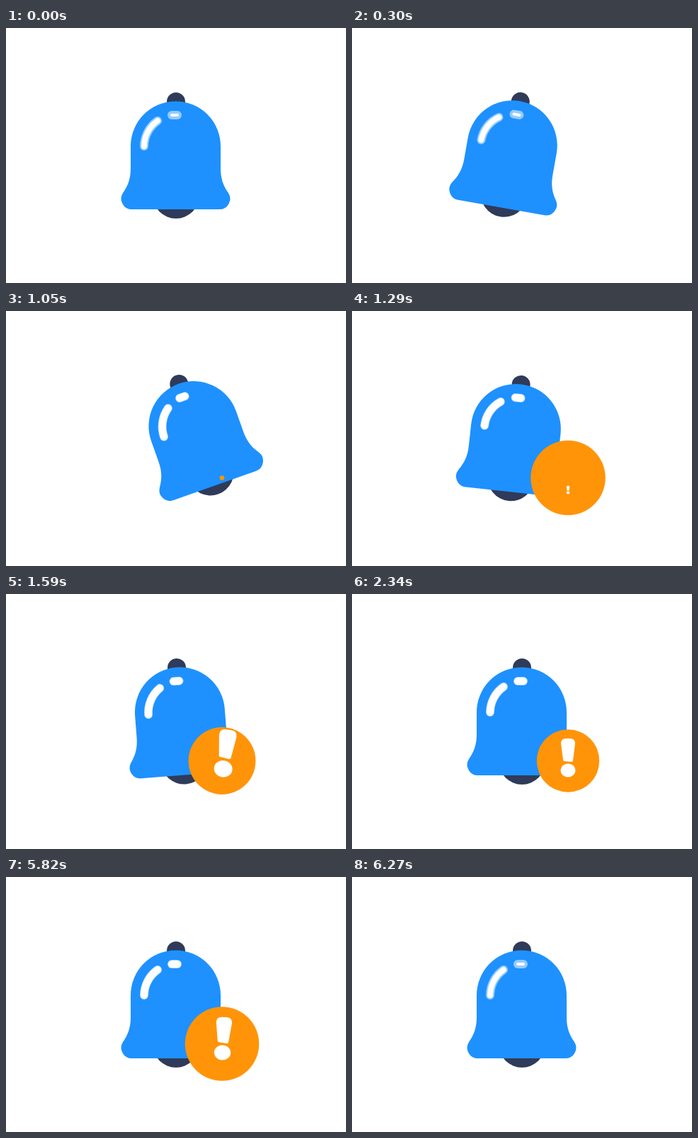
These frames come from a looping animation (480x360 px, 6300 ms). An HTML page:

```html
<!DOCTYPE html>
<html lang="en">
<head>
<meta charset="utf-8">
<title>Bell alert</title>
<style>
  html, body { margin: 0; width: 100%; height: 100%; overflow: hidden; background: #fff; }
  svg { display: block; width: 100%; height: 100%; }
  .shine { fill: none; stroke-width: 12; stroke-linecap: round; }
  .glow { stroke: #94cbfd; }
  .core { stroke: #fff; }
</style>
</head>
<body>
<svg viewBox="0 0 480 360">
  <defs>
    <path id="arc" d="M195 167A44.5 44.5 0 0 1 214 131"/>
    <path id="pill" d="M234 123H242"/>
  </defs>
  <g id="bell">
    <g fill="#2f3b59">
      <circle cx="240" cy="104" r="13"/>
      <circle cx="240" cy="236" r="33"/>
    </g>
    <path fill="#1e91ff" d="M176 198V167A63.5 63.5 0 0 1 303 167V198C303 213 307 223 314 233
      A15 15 0 0 1 301 256H178A15 15 0 0 1 165 233C172 223 176 213 176 198Z"/>
    <g class="shine glow"><use href="#arc"/><use href="#pill"/></g>
    <g class="shine core">
      <use href="#arc" id="arcCore"/>
      <use href="#pill" id="pillCore"/>
    </g>
  </g>
  <circle id="badge" cx="305" cy="235.5" r="0" fill="#ff9408"/>
  <g id="mark" fill="#fff">
    <path d="M295 211Q295 204 302 204H308Q315 204 315 211L312 235Q312 237 310 237L300 236Q298 236 298 234Z"/>
    <ellipse cx="305" cy="249" rx="10.5" ry="9.5"/>
  </g>
</svg>
<script>
const LOOP = 6300, STEP = 30;
// The badge leaves by playing its entrance backwards.
const TURN = 3645;

// Keyframes as [ms, value], eased in and out between neighbours.
const swing = [[0, 0], [655, 23], [1075, -20], [1395, 15], [1675, -10], [1870, 5], [2080, -2], [2340, 0]];
const badgeScale = [[1000, 0], [1333, 1.25], [1733, 1]];
const markScale = [[1200, 0], [1540, 1.25], [1930, 1]];
const markTilt = [[1380, 0], [1590, 8], [1760, -8], [1930, 5], [2100, 0]];

const byId = id => document.getElementById(id);
const bell = byId('bell'), badge = byId('badge'), mark = byId('mark');
const arcCore = byId('arcCore'), pillCore = byId('pillCore');

function valueAt(keys, t) {
  if (t <= keys[0][0]) return keys[0][1];
  const next = keys.findIndex(key => key[0] > t);
  if (next < 0) return keys[keys.length - 1][1];
  const [t0, a] = keys[next - 1], [t1, b] = keys[next];
  const k = (t - t0) / (t1 - t0);
  return a + (b - a) * k * k * (3 - 2 * k);
}

function shineWidths(t) {
  if (t >= 840 && t < 6255) return [10.5, 10.5];
  return t >= 315 && t < 840 ? [0, 7] : [8, 4];
}

function draw(t) {
  const entry = t < TURN ? t : 2 * TURN - t;
  const [arcWidth, pillWidth] = shineWidths(t);
  bell.setAttribute('transform', `rotate(${valueAt(swing, t)} 239.5 91)`);
  arcCore.style.strokeWidth = arcWidth;
  pillCore.style.strokeWidth = pillWidth;
  badge.setAttribute('r', 44.2 * valueAt(badgeScale, entry));
  mark.setAttribute('transform', `translate(305 258.5) rotate(${valueAt(markTilt, entry)})
    scale(${valueAt(markScale, entry)}) translate(-305 -258.5)`);
}

const start = performance.now();
function tick() {
  const t = (performance.now() - start) % LOOP;
  draw(Math.floor(t / STEP) * STEP);
  requestAnimationFrame(tick);
}
tick();
</script>
</body>
</html>
```
